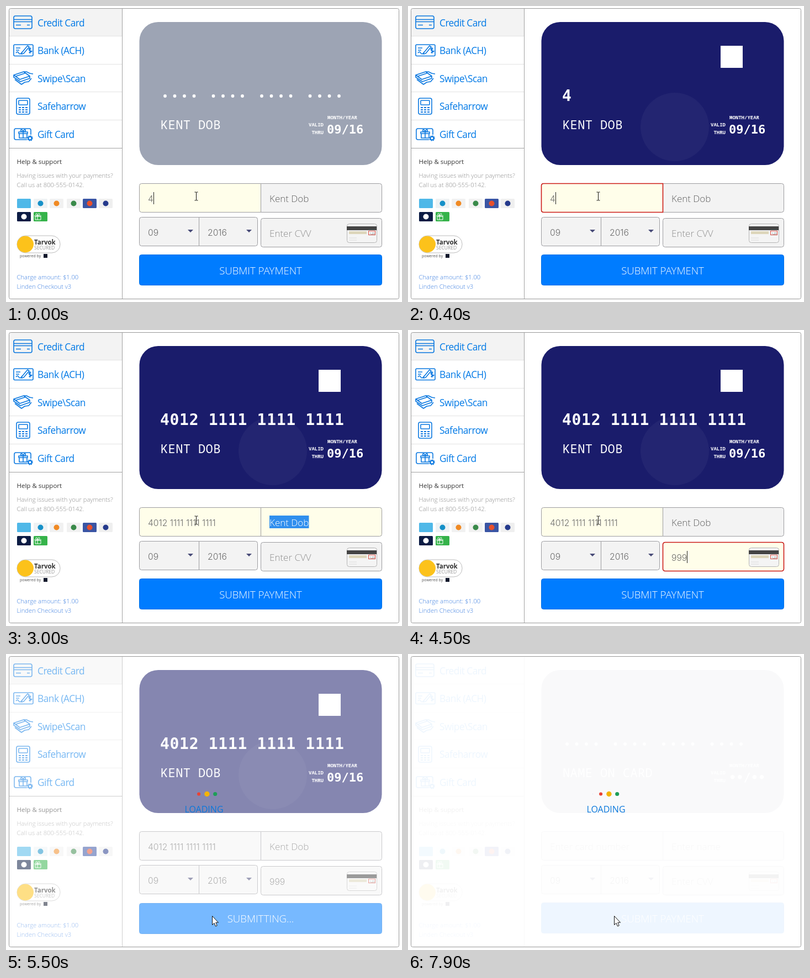
Recreate the animation shown at these times as an HTML page. Size 717x536 px, loop 8000 ms.

```html
<!DOCTYPE html>
<html lang="en">
<head>
<meta charset="utf-8">
<title>Card payment form</title>
<style>
html, body { margin: 0; width: 100%; height: 100%; overflow: hidden; background: #fff; }
svg { display: block; width: 717px; height: 536px; font-family: "Open Sans", "Noto Sans", sans-serif; }
text { white-space: pre; }
.menu { font-size: 17.3px; letter-spacing: -.5px; fill: #0079e6; }
.small { font-size: 11.2px; font-weight: 300; fill: #8c8c8c; }
.link { fill: #3d7fe0; }
.icon { fill: none; stroke: #0a78e0; stroke-width: 1.6; stroke-linejoin: round; }
.field { fill: #f3f3f3; stroke: #9c9ca0; }
.field.on { fill: #fffeea; }
.alert { fill: none; stroke: #cc1a16; stroke-width: 1.6; }
.value { font-size: 17px; font-weight: 300; fill: #606060; }
.digits { font: 300 15.7px Inter, "Open Sans", sans-serif; fill: #6c6c6c; }
.hint { font: 300 17px "Open Sans", sans-serif; fill: #8e8e8e; }
.mono { font-family: "Noto Sans Mono", "DejaVu Sans Mono", monospace; font-weight: 500; fill: #fff; }
.bold { font-family: "DejaVu Sans Mono", monospace; font-weight: 700; }
.tiny { font-size: 9px; font-weight: 600; }
</style>
</head>
<body>
<svg viewBox="0 0 717 536">
  <!-- sidebar -->
  <path d="M6 5h204v50H6z" fill="#f3f3f3"/>
  <path d="M6 54.5h204M6 105.5h204M6 155.5h204M6 206.5h204" stroke="#e3e3e3"/>
  <path d="M6 257.5h204M210.5 5v525" stroke="#a2a2a2"/>
  <g class="menu">
    <text x="57" y="37">Credit Card</text>
    <text x="57" y="87">Bank (ACH)</text>
    <text x="57" y="138">Swipe\Scan</text>
    <text x="57" y="188">Safeharrow</text>
    <text x="57" y="239">Gift Card</text>
  </g>
  <g class="icon">
    <rect x="14" y="18" width="33" height="23" rx="3"/>
    <path d="M14 24.500h33M14 28.500h33M18 34.500h9M38 34.500h5"/>
    <rect x="14" y="70" width="35" height="20.500" rx="2"/>
    <path d="M18 76h8M18 80h6M18 85q3-4 5 0t6-1l10-12 3 2-10 12-4 1 1-4M45.500 77.500q-4-2-4 1t4 3-4 3M43.500 75v11"/>
    <path d="M14 125l18-6 11 8-18 6zM17 127.500l18-6M14 125v4l12 8 17-6v-4M16 133l12 9 6-4 7-1 5-6M32 119h5l6 3 6 1"/>
    <rect x="19" y="167" width="24" height="29" rx="3"/>
    <rect x="23" y="171" width="16" height="8" rx="1"/>
    <path d="M23 184h4m2 0h4m2 0h4M23 188h4m2 0h4m2 0h4M23 192h4m2 0h4m2 0h4" stroke-width="2"/>
    <path d="M38 242H18q-3 0-3-3v-14q0-3 3-3h24q3 0 3 3v8"/>
    <path d="M24 231h14v8H24zM23 228h16v3H23zM31 228v11M31 228q-6-1-4-4 3-1 4 4 1-5 4-4 2 3-4 4"/>
    <circle cx="43.500" cy="239.500" r="3" stroke-width="2"/>
    <circle cx="43.500" cy="239.500" r="4.500" stroke-dasharray="1.8 1.73"/>
  </g>
  <text x="19.500" y="286" font-size="11.500" fill="#333">Help &amp; support</text>
  <g class="small">
    <text x="19.500" y="311">Having issues with your payments?</text>
    <text x="19.500" y="328">Call us at 800-555-0142.</text>
    <text class="link" x="19.500" y="495">Charge amount: $1.00</text>
    <text class="link" x="19.500" y="512">Linden Checkout v3</text>
  </g>
  <g id="badges"></g>
  <path d="M57 378v9M51 380h13M53 381h10v6H53zM57.500 380q-5-1-3-4 3-1 3 4 0-5 3-4 2 3-3 4" fill="none" stroke="#fff"/>
  <rect x="20" y="416" width="78" height="31" rx="15" fill="#fff" stroke="#bbb"/>
  <circle cx="35" cy="431.500" r="15" fill="#fcc21b"/>
  <text x="51" y="432" font-size="11.500" font-weight="700" fill="#333">Tarvok</text>
  <text x="51" y="441" font-size="8.500" fill="#999">SECURED</text>
  <text x="25" y="455" font-size="7" fill="#555">powered by</text>
  <rect x="68" y="449" width="7" height="7" fill="#10182c"/>

  <!-- card -->
  <rect id="card" x="241.500" y="29" width="439" height="259" rx="34"/>
  <g id="brand" fill="#fff">
    <circle cx="483" cy="219" r="62" opacity=".04"/>
    <rect x="566" y="72" width="40" height="40"/>
  </g>
  <g id="bullets" fill="#fff"></g>
  <text id="cardNumber" class="mono bold" x="279" y="172" font-size="28" letter-spacing=".7"></text>
  <text id="cardName" class="mono" x="280" y="223" font-size="22" letter-spacing=".4"></text>
  <g class="mono">
    <text class="tiny" x="582" y="205">MONTH/YEAR</text>
    <text class="tiny" x="575" y="218" text-anchor="end">VALID</text>
    <text class="tiny" x="575" y="232" text-anchor="end">THRU</text>
    <text id="expiry" class="bold" x="581" y="231" font-size="22"></text>
  </g>

  <!-- form -->
  <path id="nameBox" class="field" d="M461.500 321.500h215q4 0 4 4v44q0 4-4 4h-215z"/>
  <path id="numberBox" class="field" d="M461.500 321.500h-216q-4 0-4 4v44q0 4 4 4h216z"/>
  <path id="monthBox" class="field" d="M349.500 382.500h-104q-4 0-4 4v44q0 4 4 4h104z"/>
  <path id="yearBox" class="field" d="M349.500 382.500h102q4 0 4 4v44q0 4-4 4h-102z"/>
  <rect id="cvvBox" class="field" x="461.500" y="384.500" width="219" height="52" rx="4"/>
  <path id="numberAlert" class="alert" d="M461.500 321.500h-216q-4 0-4 4v44q0 4 4 4h216z"/>
  <rect id="cvvAlert" class="alert" x="461.500" y="384.500" width="219" height="52" rx="4"/>
  <rect id="selection" x="477" y="336" height="23" fill="#308fee"/>
  <text id="number" x="257" y="355"></text>
  <text id="name" x="477" y="355"></text>
  <text class="value digits" x="257" y="416">09</text>
  <text class="value digits" x="365" y="416">2016</text>
  <text id="cvv" x="477" y="418"></text>
  <path d="M329 405h10l-5 5zM435 405h10l-5 5z" fill="#484b78"/>
  <rect x="617.500" y="394.500" width="54" height="34" rx="4" fill="#f4f4f4" stroke="#b5b5b5"/>
  <path d="M617 399h54v7h-54z" fill="#444"/>
  <path d="M621 408h32v5h-32z" fill="#ddd6bb"/>
  <path d="M621 420h14M621 424h14" stroke="#ddd"/>
  <rect x="656.500" y="407.500" width="12" height="7" fill="#fff" stroke="#d04a40"/>
  <text x="658" y="413.500" font-size="5.500" fill="#555">123</text>
  <path id="caret" stroke="#222"/>
  <rect id="button" x="241.500" width="439" height="55" rx="4" stroke="#0070e6"/>
  <text id="buttonText" x="461" y="486" text-anchor="middle" font-size="18.600" font-weight="300" fill="#fff"></text>

  <!-- loading veil -->
  <rect id="veil" x="6" y="5" width="705" height="525" fill="#fff"/>
  <g id="loader">
    <g id="dots"></g>
    <text x="358.500" y="287" text-anchor="middle" font-size="16" fill="#0a78dc">LOADING</text>
  </g>
  <rect x="5.500" y="4.500" width="706" height="526" rx="3" fill="none" stroke="#999"/>

  <!-- pointers, hot spot at 0,0 -->
  <path id="beam" d="M-3-7.500h2.500l.5.500.5-.5H3M0-7V7M-3 7.500h2.500L0 7l.5.500H3" fill="none" stroke="#111"/>
  <path id="arrow" d="M0 0v16l3.500-3.300L6 18.500l2.700-1.200L6.300 11.700H11z" fill="#fff" stroke="#111"/>
  <path id="hand" d="M-1.500 1.500q1.700-2.500 3.400 0v7q2-1.500 3 .5 2-1.200 3 .7 2.800-.7 3 2v4.500q0 3-2 4.500v1.300H.5v-1.500l-5-7.500q-1-3 1.200-2.600l1.800 2z" fill="#fff" stroke="#111"/>
</svg>
<script>
const el = id => document.getElementById(id);
const clamp = v => Math.min(1, Math.max(0, v));
const show = (id, on) => el(id).style.display = on ? "" : "none";
const set = (id, attrs) => { for (const k in attrs) el(id).setAttribute(k, attrs[k]); };
function add(parent, tag, attrs) {
  const node = document.createElementNS("http://www.w3.org/2000/svg", tag);
  for (const k in attrs) node.setAttribute(k, attrs[k]);
  return el(parent).appendChild(node);
}

// small payment badges: x, y, plate colour, mark colour
for (const [x, y, plate, mark] of [
  [20, 349, "#4fb8e8"], [50, 349, "#eef2f4", "#1690c8"], [79, 349, "#f1f1f1", "#f08a24"],
  [110, 349, "#f1f1f1", "#3a8a4a"], [139, 349, "#3a55a4", "#e8502c"], [168, 349, "#efefef", "#253a8c"],
  [20, 373, "#0c1c44", "#fff"], [50, 373, "#35b34a"]
]) {
  add("badges", "rect", { x, y, width: 25, height: 17, rx: 1.5, fill: plate });
  if (mark) add("badges", "circle", { cx: x + 12.5, cy: y + 8.5, r: 5, fill: mark });
}
for (let i = 0; i < 19; i++)
  if (i % 5 < 4) add("bullets", "circle", { cx: 288 + i * 17.5, cy: 163, r: 2.9 });
const dots = ["#4285f4", "#ea4335", "#f4b400", "#1e9e58"].map((fill, i) =>
  add("dots", "circle", { cx: 334.3 + i * 14.8, cy: 253.5, fill }));

const LOOP = 8000, RESET = 6600;
const NAME = "Kent Dob", NUMBER = "4012111111111111";
const numberKeys = [0, 500, 700, 900, 1200, 1300, 1400, 1600, 1700, 1800, 1900, 2000, 2100, 2200, 2300, 2400];
const cvvKeys = [4000, 4200, 4500];
const focusTimes = { number: 0, name: 3000, month: 3300, year: 3500, cvv: 3700, none: 5300 };

const typed = (keys, t) => keys.filter(k => k <= t).length;
const mix = (a, b, k) => `rgb(${a.map((v, i) => Math.round(v + (b[i] - v) * k))})`;

function fill(id, value, hint, digits) {
  el(id).textContent = value || hint;
  el(id).setAttribute("class", value ? "value" + (digits ? " digits" : "") : "hint");
}

function drawCaret(focus, t) {
  const keys = { number: numberKeys, cvv: cvvKeys }[focus];
  if (!keys) return show("caret", false);
  const count = typed(keys, t);
  const last = count ? keys[count - 1] : focusTimes[focus];
  const start = focus === "number" ? 257 : 477;
  const x = Math.round(start + (count ? el(focus).getComputedTextLength() : 0)) + .5;
  const y = focus === "number" ? 337 : 400;
  set("caret", { d: `M${x} ${y}v22` });
  show("caret", (t - last) % 1000 < 500);
}

function draw(t) {
  const cleared = t >= RESET;
  const focus = Object.keys(focusTimes).filter(k => focusTimes[k] <= t).pop();
  const groups = NUMBER.slice(0, typed(numberKeys, t)).replace(/(.{4})(?=.)/g, "$1 ");

  // card face
  const tint = clamp((t - 100) / 300) * (1 - clamp((t - RESET + 100) / 300));
  set("card", { fill: mix([157, 164, 180], [26, 28, 107], tint) });
  set("brand", { opacity: tint });
  const blank = t < 200 || cleared;
  show("bullets", blank);
  el("cardNumber").textContent = blank ? "" : groups;
  el("cardName").textContent = cleared ? "NAME ON CARD" : NAME.toUpperCase();
  el("expiry").textContent = cleared ? "••/••" : "09/16";

  // pointer
  const p = clamp((t - 4700) / 500), ease = p * p * (3 - 2 * p);
  const x = 344 + 29 * ease, y = 344 + 130 * ease;
  const waiting = t >= 5500;
  const overButton = y > 450 && !waiting;
  const overNumber = y < 374;
  for (const [id, on] of [["beam", overNumber], ["hand", overButton], ["arrow", !overNumber && !overButton]]) {
    show(id, on);
    set(id, { transform: `translate(${x + .5} ${y + .5})` });
  }

  // fields
  for (const f of ["number", "name", "month", "year", "cvv"])
    el(f + "Box").classList.toggle("on", f === focus || f === "number" && overNumber);
  show("numberAlert", t >= 400 && t < 2500);
  show("cvvAlert", t >= 4100 && t < 4600);
  fill("number", cleared ? "" : groups, "Enter card number", true);
  fill("name", cleared ? "" : NAME, "Enter name");
  fill("cvv", cleared ? "" : "9".repeat(typed(cvvKeys, t)), "Enter CVV", true);
  const selected = focus === "name";
  show("selection", selected);
  set("selection", { width: el("name").getComputedTextLength() });
  el("name").style.fill = selected ? "#fff" : "";
  drawCaret(focus, t);

  // button and loader
  const pressed = t >= 5400 && !cleared;
  set("button", { y: pressed ? 451.5 : 450.5, fill: overButton ? "#0f84ff" : "#007cff" });
  el("buttonText").textContent = waiting && !cleared ? "SUBMITTING..." : "SUBMIT PAYMENT";
  set("veil", { opacity: .935 * clamp((t - 5400) / 200) });
  show("loader", waiting);
  dots.forEach((dot, i) =>
    dot.setAttribute("r", 4.7 * Math.abs(Math.sin(Math.PI * (t - 7880 - 200 * i) / 800))));
}

const begin = performance.now();
function tick() {
  const t = (performance.now() - begin) % LOOP;
  draw(Math.floor(t / 100) * 100);
  requestAnimationFrame(tick);
}
tick();
</script>
</body>
</html>
```
